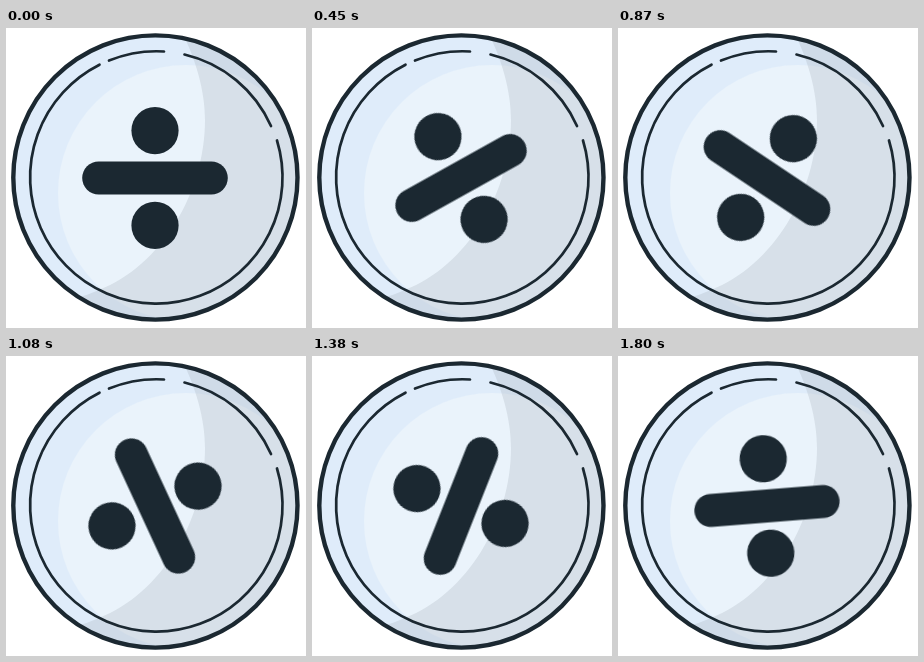
Recreate the animation shown at these times as an HTML page without scripts. Size 300x300 px, loop 1.83 s.

```html
<!DOCTYPE html>
<html lang="en">
<head>
<meta charset="utf-8">
<title>Division coin</title>
<style>
  html, body { margin: 0; width: 100%; height: 100%; overflow: hidden; background: #fff; }
  svg { display: block; width: 100vw; height: 100vh; }
  .ink { fill: #1b2831; }
  .line { fill: none; stroke: #1b2831; stroke-linecap: round; }
  .sign {
    transform-origin: 149px 150px;
    animation: turn 1830ms -4ms infinite;
  }
  /* One upright beat, then a jump to a quarter turn and a steady spin home */
  @keyframes turn {
    0% { transform: rotate(0deg); animation-timing-function: step-end; }
    1.63934% { transform: rotate(88deg); animation-timing-function: steps(35, end); }
    59.01639% { transform: rotate(245.2deg); animation-timing-function: steps(10, end); }
    75.40984% { transform: rotate(291.6deg); animation-timing-function: steps(15, end); }
    100% { transform: rotate(360deg); }
  }
</style>
</head>
<body>
<svg viewBox="0 0 300 300">
  <clipPath id="coin"><circle cx="149.4" cy="149.5" r="142.5"/></clipPath>
  <g clip-path="url(#coin)">
    <rect width="300" height="300" fill="#dfecfa"/>
    <circle cx="180" cy="165" r="128" fill="#eaf3fb"/>
    <path d="M176 4C188 28 199 60 199 92C199 165 155 238 93 262Q82 267 70 270V300H300V4Z"
          fill="#a8b4bd" fill-opacity=".3"/>
  </g>
  <circle class="line" cx="149.4" cy="149.5" r="142.1" stroke-width="4.4"/>
  <path class="line" stroke-width="2.7"
        d="M93.5 36.7A126.2 126.2 0 1 0 271 112.5M103 32.6A126.2 126.2 0 0 1 158 23.5M178.5 26.5A126.2 126.2 0 0 1 265 98"/>
  <g class="sign ink">
    <rect x="76.2" y="133.5" width="145.6" height="33" rx="16.5"/>
    <circle cx="149" cy="102.6" r="23.6"/>
    <circle cx="149" cy="197.4" r="23.6"/>
  </g>
</svg>
</body>
</html>
```
